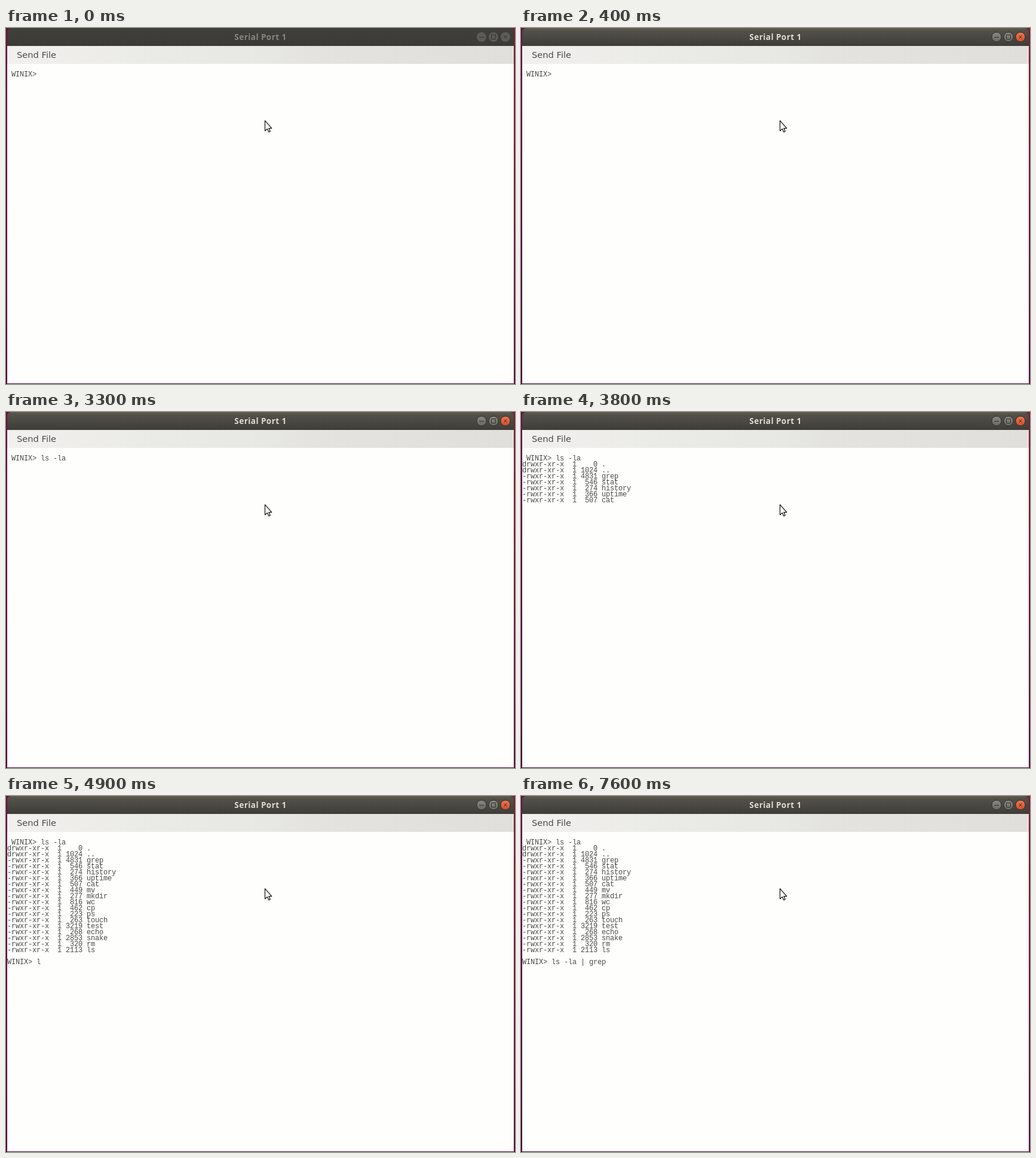
Animation, 852 px wide and 595 px high, one loop 8 s. Source, as an HTML page:

```html
<!DOCTYPE html>
<html lang="en">
<head>
<meta charset="utf-8">
<title>Serial terminal</title>
<style>
  html, body { margin: 0; width: 100%; height: 100%; overflow: hidden; background: #fefefd; }
  svg { display: block; }
  .title { font: bold 13.5px "Open Sans", "Noto Sans", sans-serif; letter-spacing: .45px; text-anchor: middle; }
  .menu { font: 14.667px "DejaVu Sans", sans-serif; fill: #4c4c4c; }
  #term { font: 12px "Liberation Mono", monospace; fill: #4a4a4a; }
  .glyph { fill: none; stroke: #33322e; stroke-width: 1; }
</style>
</head>
<body>
<svg width="852" height="595" viewBox="0 0 852 595">
  <defs>
    <linearGradient id="leftEdge" x2="0" y2="1">
      <stop stop-color="#6b0c3c"/><stop offset="1" stop-color="#4a0a36"/>
    </linearGradient>
    <linearGradient id="rightEdge" x2="0" y2="1">
      <stop stop-color="#861a2a"/><stop offset="1" stop-color="#5c0f38"/>
    </linearGradient>
    <linearGradient id="dimBar" x2="0" y2="1">
      <stop stop-color="#403f3a"/><stop offset="1" stop-color="#3b3a36"/>
    </linearGradient>
    <linearGradient id="litBar" x2="0" y2="1">
      <stop stop-color="#56544b"/><stop offset="1" stop-color="#3e3d38"/>
    </linearGradient>
    <linearGradient id="menuBar">
      <stop stop-color="#f2f0ee"/><stop offset=".25" stop-color="#ebebe8"/>
      <stop offset=".52" stop-color="#e7e8e3"/><stop offset=".6" stop-color="#e4e3df"/>
      <stop offset="1" stop-color="#e1dfdc"/>
    </linearGradient>
    <linearGradient id="grayKnob" x2="0" y2="1">
      <stop stop-color="#8b8981"/><stop offset="1" stop-color="#6a6861"/>
    </linearGradient>
    <linearGradient id="redKnob" x2="0" y2="1">
      <stop stop-color="#f07750"/><stop offset="1" stop-color="#d94d28"/>
    </linearGradient>
    <path id="barShape" d="M2 30V7Q2 0 9 0H843Q850 0 850 7V30Z"/>
  </defs>

  <rect width="852" height="595" fill="#4a0a36"/>
  <rect width="9" height="595" fill="url(#leftEdge)"/>
  <rect x="843" width="9" height="595" fill="url(#rightEdge)"/>
  <rect x="2" y="30" width="848" height="564" fill="#fefefd"/>
  <rect x="2" y="30" width="848" height="30" fill="url(#menuBar)"/>
  <text class="menu" x="18" y="50">Send File</text>

  <use href="#barShape" fill="url(#dimBar)"/>
  <text class="title" x="426" y="20" fill="#87857d">Serial Port 1</text>
  <g fill="#5d5b55">
    <circle cx="796" cy="15" r="8"/><circle cx="816" cy="15" r="8"/><circle cx="836" cy="15" r="8"/>
  </g>
  <g id="lit">
    <use href="#barShape" fill="url(#litBar)"/>
    <path d="M8 1.5H844" stroke="#67655b"/>
    <text class="title" x="426" y="20" fill="#dfdbd2">Serial Port 1</text>
    <g stroke="#33322e">
      <circle cx="796" cy="15" r="8" fill="url(#grayKnob)"/>
      <circle cx="816" cy="15" r="8" fill="url(#grayKnob)"/>
      <circle cx="836" cy="15" r="8" fill="url(#redKnob)"/>
    </g>
  </g>
  <path class="glyph" d="M792 15.5H800M812.5 11.5H819.5V18.5H812.5ZM833.5 12.5L838.5 17.5M838.5 12.5L833.5 17.5"/>

  <g id="term"></g>

  <path d="M433.5 154.8V172L437.3 168.6L439.9 173.9L442.3 172.8L439.9 167.6H444.8Z"
        fill="#fff" stroke="#111" stroke-width="1.2" stroke-linejoin="round"/>
</svg>

<script>
  const LOOP = 8000, CELL = 7, LEFT = 2, TOP = 81, PITCH = 10;
  const PROMPT = "WINIX> ";

  const files = [
    [0, "."], [1024, ".."], [4831, "grep"], [546, "stat"], [274, "history"], [366, "uptime"],
    [507, "cat"], [449, "mv"], [277, "mkdir"], [816, "wc"], [462, "cp"], [223, "ps"],
    [263, "touch"], [3219, "test"], [268, "echo"], [2853, "snake"], [320, "rm"], [2113, "ls"]
  ];
  const listing = files.map(([size, name], i) =>
    `${i < 2 ? "d" : "-"}rwxr-xr-x  1 ${String(size).padStart(4)} ${name}`);

  // Steps are [start time, value].
  const focus = [[0, 0], [300, 0.55], [400, 1]];
  const firstCommand = [[0, ""], [1600, "l"], [1700, "ls"], [2800, "ls -"], [3100, "ls -l"], [3300, "ls -la"]];
  const listed = [[0, 0], [3800, 7], [3900, 14], [4000, 18]];
  const secondCommand = [
    [0, ""], [4900, "l"], [5000, "ls"], [5400, "ls -"], [5700, "ls -l"], [5900, "ls -la"],
    [6600, "ls -la |"], [7100, "ls -la | g"], [7300, "ls -la | gr"],
    [7500, "ls -la | gre"], [7600, "ls -la | grep"]
  ];

  const valueAt = (steps, t) => steps.findLast(([start]) => start <= t)[1];
  const term = document.getElementById("term");
  const lit = document.getElementById("lit");

  const rows = Array.from({ length: listing.length + 3 }, (_, i) => {
    const row = document.createElementNS("http://www.w3.org/2000/svg", "text");
    row.setAttribute("y", TOP + PITCH * i);
    return term.appendChild(row);
  });

  // Terminal text sits on a fixed character grid.
  function setRow(i, line) {
    const text = line.replaceAll(" ", "\u00a0");
    if (rows[i].textContent === text) return;
    rows[i].setAttribute("x", [...text].map((_, col) => LEFT + CELL * col).join(" "));
    rows[i].textContent = text;
  }

  function render(t) {
    const count = valueAt(listed, t);
    lit.setAttribute("opacity", valueAt(focus, t));
    setRow(0, " " + PROMPT + valueAt(firstCommand, t));
    listing.forEach((line, i) => setRow(i + 1, i < count ? line : ""));
    setRow(rows.length - 1, count === listing.length ? PROMPT + valueAt(secondCommand, t) : "");
  }

  const begin = performance.now();
  function tick() {
    render((performance.now() - begin) % LOOP);
    requestAnimationFrame(tick);
  }
  tick();
</script>
</body>
</html>
```
